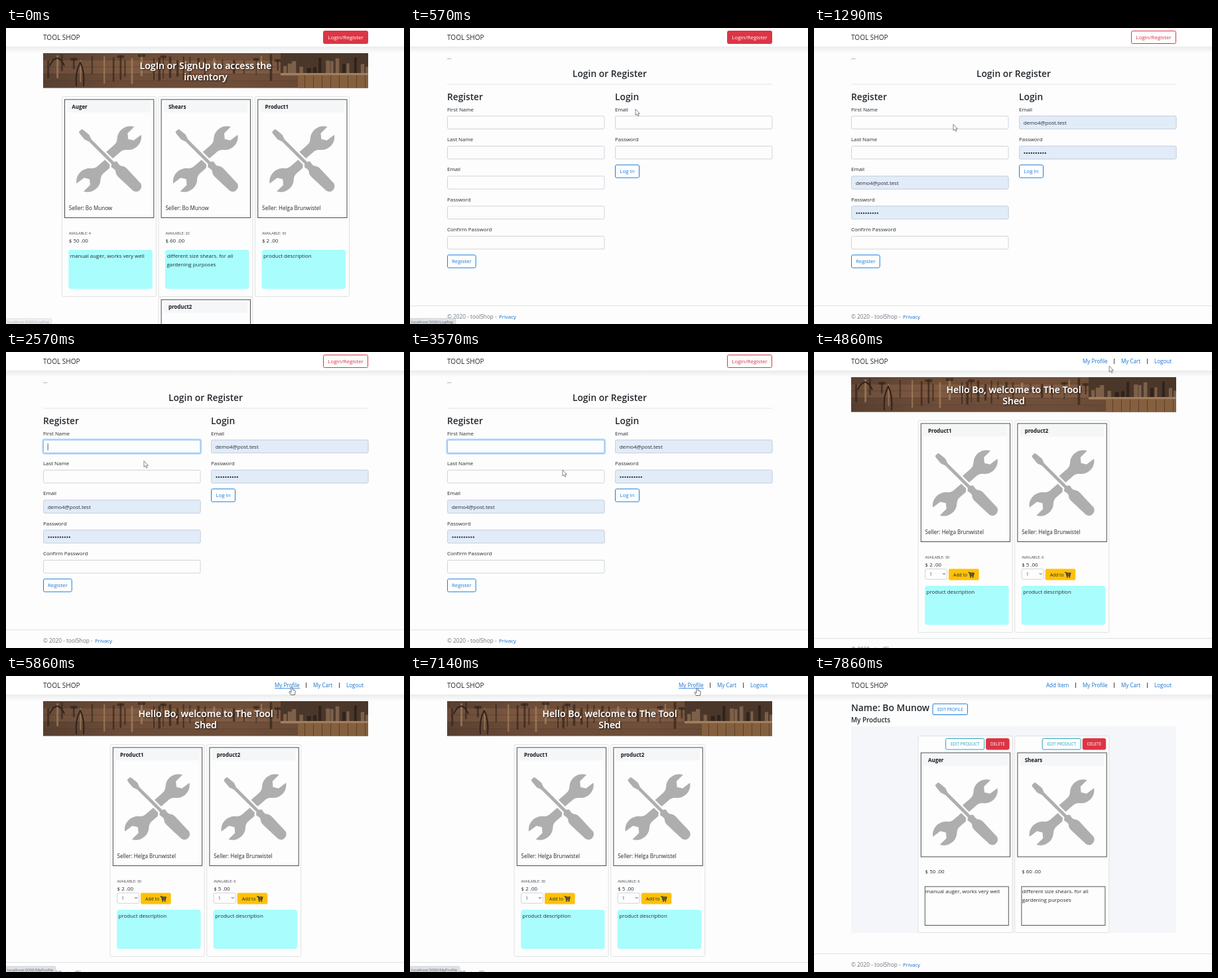
Animation, 600 px wide and 447 px high, one loop 8000 ms. Source, as an HTML page:

```html
<!DOCTYPE html>
<html lang="en">
<head>
<meta charset="utf-8">
<title>Tool shop</title>
<style>
  html, body { margin: 0; width: 100%; height: 100%; overflow: hidden; background: #fdfdfd; }
  svg { display: block; width: 100%; height: 100%; }
  text { font-family: "Open Sans", "Noto Sans", sans-serif; white-space: pre; }
</style>
</head>
<body>
<svg id="stage" viewBox="0 0 600 447" xmlns="http://www.w3.org/2000/svg"></svg>
<script>
const BG = '#fdfdfd', INK = '#24292e', LINK = '#1470d2', BLUE = '#1a7fdc', RED = '#dc3545';
const LOOP = 8000, FPS = 7;
const SELLER = 'Bo Munow', OTHER = 'Helga Brunwistel', MAIL = 'demo4@post.test';

const text = (x, y, s, size = 7.9, fill = INK, extra = '') =>
  `<text x="${x}" y="${y}" font-size="${size}" fill="${fill}" ${extra}>${s}</text>`;
const rect = (x, y, w, h, fill, stroke = 'none', r = 0, extra = '') =>
  `<rect x="${x}" y="${y}" width="${w}" height="${h}" rx="${r}" fill="${fill}" stroke="${stroke}" ${extra}/>`;
const path = (d, fill, extra = '') => `<path d="${d}" fill="${fill}" ${extra}/>`;
const group = (id, body) => `<g id="${id}">${body}</g>`;
const at = (x, y, body) => `<g transform="translate(${x} ${y})">${body}</g>`;
const SEMI = 'font-weight="600"', BOLD = 'font-weight="700"', MID = 'text-anchor="middle"';

function random(seed) {
  return () => (seed = (seed * 16807) % 2147483647) / 2147483647;
}

const defs = `<defs>
  <linearGradient id="shade" x2="0" y2="1">
    <stop offset="0" stop-color="#000" stop-opacity=".07"/><stop offset="1" stop-color="#000" stop-opacity="0"/>
  </linearGradient>
  <linearGradient id="wood">
    <stop offset="0" stop-color="#5f4535"/><stop offset=".25" stop-color="#76533d"/>
    <stop offset=".6" stop-color="#78563f"/><stop offset="1" stop-color="#6a4a35"/>
  </linearGradient>
  <clipPath id="frame">${rect(56, 38, 490, 52.5, '#000')}</clipPath>
  <filter id="glow"><feDropShadow dx="1" dy="1" stdDeviation="1" flood-color="#000" flood-opacity=".85"/></filter>
  <g id="tools">${tools()}</g>
  <g id="banner" clip-path="url(#frame)">${banner()}</g>
</defs>`;

// Crossed wrench and screwdriver, centred on the origin
function tools() {
  const head = 'M-8 -20L-7 -6L0 -1L7 -6L8 -20C18 -14 20 -1 14 8C10 13 7 14 7 22V43H-7V22C-7 14 -10 13 -14 8C-20 -1 -18 -14 -8 -20Z';
  const driver = 'M-61 -3L-58 -4L-47 -5L-40 -2.4H8L11 -6L17 -5L20 -5.5Q24 -9.5 30 -9L60 -8Q66 -6 66 0Q66 6 60 8L30 9Q24 9.5 20 5.5L17 5L11 6L8 2.4H-40L-47 5L-58 4L-61 3Z';
  return `<g transform="rotate(45)">
    ${path(head, '#aeaeae', 'transform="translate(-1 -41) rotate(4)"')}
    ${path(head, '#aeaeae', 'transform="translate(1 41) rotate(184)"')}
    ${path(driver, '#aeaeae', `stroke="${BG}" stroke-width="5" paint-order="stroke"`)}
  </g>`;
}

// Workshop wall: planks, hanging tools and a shelf in flat tones
function banner() {
  const rnd = random(71);
  let s = rect(56, 38, 490, 53, 'url(#wood)');
  for (let y = 38; y < 91; y += 10.5) {
    s += rect(56, y, 490, 10, rnd() < .5 ? '#000' : '#c08a60', 'none', 0, `opacity="${(.05 + rnd() * .1).toFixed(2)}"`);
    s += rect(56, y + 10, 490, .6, '#3c2a20', 'none', 0, 'opacity=".5"');
  }
  for (let x = 62; x < 410; x += 6 + rnd() * 15) {
    const top = 39 + rnd() * 10, h = 14 + rnd() * 28, w = 1.2 + rnd() * 2.5;
    s += rect(x, top, w, h, rnd() < .75 ? '#33241c' : '#a5835f', 'none', 1, 'opacity=".7"');
    if (rnd() < .3) s += rect(x - 4, top, w + 8, 4, '#33241c', 'none', 1, 'opacity=".7"');
  }
  s += path('M66 57Q77 34 88 57M106 88Q104 66 112 52Q119 66 117 88', 'none', 'stroke="#2f211a" stroke-width="2"');
  s += rect(414, 38, 132, 30, '#4b372a');
  for (let x = 418; x < 544; x += 6 + rnd() * 6) {
    const h = 6 + rnd() * 18;
    s += rect(x, 68 - h, 3 + rnd() * 4, h, rnd() < .5 ? '#2f231b' : '#7d6049');
  }
  s += rect(414, 68, 132, 3.5, '#a2805e') + rect(440, 71.5, 106, 20, '#85603f');
  for (let x = 450; x < 546; x += 13) s += rect(x, 71.5, 1, 20, '#5b402c');
  return s;
}

const title = (y, s) => text(301, y, s, 14.1, '#fff', `${SEMI} ${MID} filter="url(#glow)"`);
const hero = (a, b) => '<use href="#banner"/>' + title(61.5, a) + title(79, b);

const button = (x, y, w, h, s, size, color, solid) =>
  rect(x + .5, y + .5, w - 1, h - 1, solid ? color : BG, color, 2) +
  text(x + w / 2, y + h / 2 + size * .37, s, size, solid ? '#fff' : color, MID);

const footer = y =>
  rect(0, y, 600, 1, '#dfe2e6') +
  text(56, y + 19.5, '© 2020 - toolShop - ', 8.3, '#6c757d') +
  text(134, y + 19.5, 'Privacy', 7.9, LINK);

const header = rect(0, 0, 600, 28, '#fff') + rect(0, 28, 600, 10, 'url(#shade)') +
  text(56, 18, 'TOOL SHOP', 10.05);

const link = (x, s) => text(x, 17.3, s, 8.05, LINK);
const bar = x => rect(x, 10, 1, 8, '#444');
const userNav = link(405, 'My Profile') + bar(452) + link(463, 'My Cart') + bar(502) + link(513, 'Logout');

// Shared top of a card: dark frame, title strip, tool picture
const picture = (y, h, name) =>
  rect(4.7, y + .5, 134.3, h, BG, '#4a4a4a') + rect(8.5, y + 2.5, 126, 17.5, '#f4f6f8') +
  text(15.5, y + 14, name, 7.9, '#16191c', BOLD) +
  `<use href="#tools" x="71.3" y="${y + 90.5}"/>`;
const outline = h => rect(.5, .5, 142, h, BG, '#e0e1e2', 2);
const lines = (x, y, s) => s.split('\n').map((l, i) => text(x, y + i * 12.7, l, 7.95)).join('');

function details(item, y) {
  return text(11, 172, 'Seller: ' + item.seller, 8.05) +
    text(11, 208.5, 'AVAILABLE: ' + item.stock, 5.5, '#3c4146') +
    text(11, 221, `$ ${item.price} .00`, 7.95) +
    rect(10.5, y, 126.5, 59, '#a9fdfd', 'none', 4) + lines(13, y + 12, item.note);
}

const shopCard = item => outline(302) + picture(4.5, 178.5, item.name) + details(item, 232);

const cart = path('M0 1H2L3 6H7.5L8.5 2H2.5M3 4H8', 'none', 'stroke="#343a40" stroke-width="1.3"') +
  '<circle cx="3.6" cy="8" r="1" fill="#343a40"/><circle cx="7" cy="8" r="1" fill="#343a40"/>';

const storeCard = item => outline(320) + picture(4.5, 178.5, item.name) + details(item, 250) +
  rect(11, 224.7, 33, 15.5, BG, '#ced4da', 2) + text(17.5, 235.3, '1', 7.2, '#495057') +
  path('M37.5 231l2 2l2 -2', 'none', 'stroke="#444" stroke-width=".9"') +
  rect(46.5, 224.5, 45.5, 17, '#ffc107', 'none', 2) +
  text(53.5, 236, 'Add to', 6.8) + at(76, 229, cart);

const ownCard = item => outline(297) +
  button(41.5, 4, 59, 17.5, 'EDIT PRODUCT', 6.2, '#2ba3bd') +
  button(102.5, 4, 35.5, 17.5, 'DELETE', 6.2, RED, true) +
  picture(25.5, 157, item.name) + text(11, 208, `$ ${item.price} .00`, 7.95) +
  rect(10.7, 228, 126, 58.5, 'none', '#555') + lines(11.5, 238, item.note);

const item = (name, seller, stock, price, note) => ({ name, seller, stock, price, note });
const auger = item('Auger', SELLER, 4, 50, 'manual auger, works very well');
const shears = item('Shears', SELLER, 20, 60, 'different size shears. for all\ngardening purposes');
const first = item('Product1', OTHER, 30, 2, 'product description');
const second = item('product2', OTHER, 6, 5, 'product description');
const row = (x, y, items, card) => items.map((it, i) => at(x + i * 145.6, y, card(it))).join('');

const shop = hero('LogIn or SignUp to access the', 'inventory') +
  row(83.8, 103, [auger, shears, first], shopCard) + row(229.4, 405.3, [second], shopCard);

const store = footer(432) + hero('Hello Bo, welcome to The Tool', 'Shed') +
  row(156.6, 103, [first, second], storeCard) + userNav;

const profile = text(56, 52.5, 'Name: ' + SELLER, 13.8, INK, SEMI) +
  button(178.5, 41.5, 53.5, 17.5, 'EDIT PROFILE', 6.2, BLUE) +
  text(56, 70, 'My Products', 9.85, INK, SEMI) + rect(56, 76, 490, 312, '#f4f6f9') +
  row(156.6, 90, [auger, shears], ownCard) + footer(419) +
  link(350, 'Add Item') + bar(394) + userNav;

const field = (x, i, label) =>
  text(x, 125.5 + i * 45.35, label) +
  rect(x + .5, 133 + i * 45.35, 236.5, 19.5, BG, '#ced4da', 2);
const filled = (x, i, body) =>
  rect(x + .5, 133 + i * 45.35, 236.5, 19.5, '#e2ecf9', '#c9d3de', 2) + body(x + 6.7, 143 + i * 45.35);
const mail = (x, y) => text(x, y + 3, MAIL);
const dots = (x, y) => Array.from({ length: 10 }, (_, i) =>
  `<circle cx="${x + 1.8 + i * 3.48}" cy="${y + .6}" r="1.15" fill="${INK}"/>`).join('');

const login = text(56, 47, '...') + text(301, 73.5, 'Login or Register', 13.8, INK, `${SEMI} ${MID}`) +
  rect(56, 84.5, 490, 1, '#e3e4e5') +
  text(56, 108.5, 'Register', 13.7, INK, SEMI) + text(309, 108.5, 'Login', 13.8, INK, SEMI) +
  ['First Name', 'Last Name', 'Email', 'Password', 'Confirm Password'].map((l, i) => field(56, i, l)).join('') +
  ['Email', 'Password'].map((l, i) => field(309, i, l)).join('') +
  group('autofill', filled(56, 2, mail) + filled(56, 3, dots) + filled(309, 0, mail) + filled(309, 1, dots)) +
  group('blurred', rect(56.5, 133, 236.5, 19.5, 'none', '#9fd0f5', 2)) +
  group('focus', rect(55.3, 131.8, 238.9, 21.9, 'none', '#b8d9fb', 3, 'stroke-width="2"') +
    rect(56.5, 133, 236.5, 19.5, BG, '#80bdff', 2)) +
  group('caret', rect(62.7, 138, .9, 10.5, '#5c4a40')) +
  button(56, 342.3, 43.7, 20.3, 'Register', 7.9, BLUE) +
  button(309, 206.3, 37, 20.3, 'Log In', 7.9, BLUE) +
  group('pressed', rect(308.2, 205.5, 38.6, 21.9, '#9ccbff', 'none', 3) +
    button(309, 206.3, 37, 20.3, 'Log In', 7.9, '#007bff', true)) +
  footer(419);

const status = (id, w, s) => group(id,
  path(`M0 438.5H${w - 2}Q${w} 438.5 ${w} 440.5V447H0Z`, '#dee1e6', 'stroke="#c9ccd0" stroke-width=".6"') +
  text(2, 446.3, 'localhost:5000/' + s, 6, '#5f6368'));

const arrow = path('M0 0V9.2L2.1 7.4L3.6 10.6L5.1 9.9L3.7 6.8H6.4Z', '#fff', 'stroke="#666" stroke-width=".8"');
const hand = path('M-1.2 .8Q0 -.6 1.1 .8V4L4.4 4.8Q5.4 5.2 5.2 6.6L4.3 11.5H-1.6L-4 7.4Q-4 6 -2.6 6.6L-1.2 7.8Z',
  '#fff', 'stroke="#444" stroke-width=".8"');

const stage = document.getElementById('stage');
stage.innerHTML = defs + header +
  group('shop', shop) + group('login', login) + group('store', store) + group('profile', profile) +
  group('solid', button(478, 4, 68, 20, 'Login/Register', 8, RED, true)) +
  group('hollow', button(478, 4, 68, 20, 'Login/Register', 8, RED)) +
  group('underline', rect(405, 18.4, 38, .8, LINK)) +
  status('toLogin', 69, 'LogReg') + status('toProfile', 75, 'MyProfile') +
  group('cursor', group('arrow', arrow) + group('hand', hand));

const parts = {};
stage.querySelectorAll('g[id]').forEach(g => parts[g.id] = g);
const show = (id, on) => parts[id].style.display = on ? '' : 'none';

// Pointer keys: step, x, y
const keys = [
  [3, 420, 60], [4, 340, 122.5], [6, 290, 150], [8, 215, 150], [10, 205, 141], [15, 208, 164.5],
  [18, 208, 164.5], [22, 230, 178], [25, 230, 178], [28, 330, 210], [31, 331, 210], [32, 345, 190],
  [33, 345, 190], [34, 445, 21], [36, 437, 18], [41, 431, 17], [46, 433, 18], [56, 433, 18]
];

function pointer(n) {
  const i = Math.max(1, keys.findIndex(k => k[0] >= n));
  const [a, x0, y0] = keys[i - 1], [b, x1, y1] = keys[i];
  const p = Math.max(0, (n - a) / (b - a));
  return [x0 + (x1 - x0) * p, y0 + (y1 - y0) * p];
}

function draw(ms) {
  const n = Math.min(LOOP * FPS / 1000 - 1, Math.floor((ms % LOOP + 8) * FPS / 1000));
  const within = (a, b) => n >= a && n < b;

  show('shop', n < 3);
  show('login', within(3, 31));
  show('store', within(31, 52));
  show('profile', n >= 52);

  show('solid', n < 6);
  show('hollow', within(6, 31));
  show('autofill', n >= 6);
  show('focus', within(10, 29));
  show('caret', within(10, 29) && Math.floor((n - 10) / 4) % 2 === 0);
  show('blurred', n >= 29);
  show('pressed', n >= 28);

  show('toLogin', n < 7);
  parts.toLogin.style.opacity = n ? 1 : .5;
  show('toProfile', within(36, 52));
  show('underline', within(36, 53));

  const onLink = within(28, 31) || n >= 36;
  show('cursor', within(3, 53));
  show('hand', onLink);
  show('arrow', !onLink);
  parts.cursor.setAttribute('transform', `translate(${pointer(n)})`);
}

const start = performance.now();
function tick(now) {
  draw(Math.max(0, now - start));
  requestAnimationFrame(tick);
}
draw(0);
requestAnimationFrame(tick);
</script>
</body>
</html>
```
